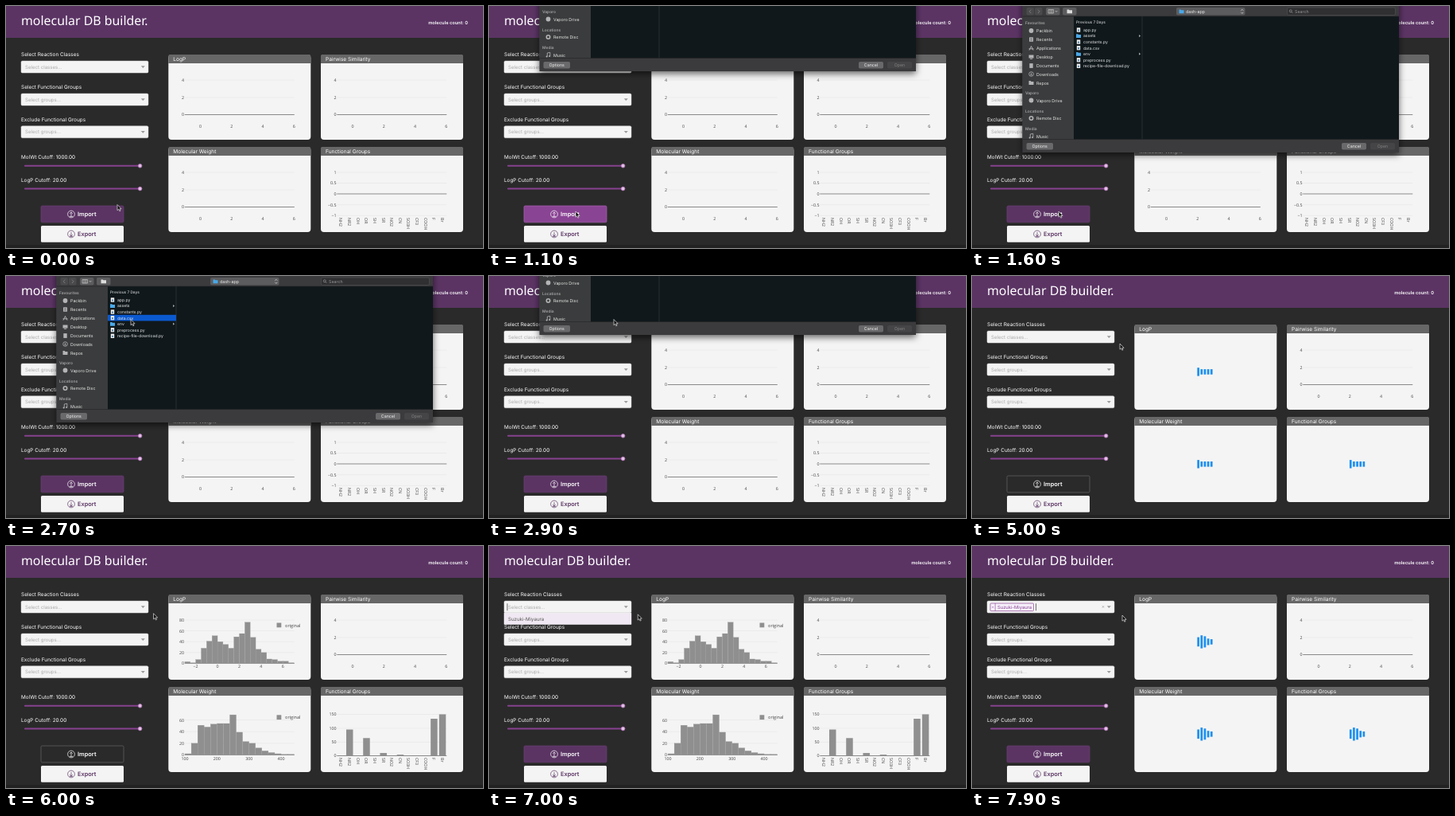
Write an HTML page that moves like this. It is 600 by 304 pixels and loops after 8 s.

```html
<!DOCTYPE html>
<html lang="en">
<head>
<meta charset="utf-8">
<title>molecular DB builder</title>
<style>
html, body { margin: 0; width: 100%; height: 100%; overflow: hidden; background: #2a2a2a; }
svg { display: block; width: 600px; height: 304px; }
text { font-family: Inter, "Open Sans", sans-serif; text-rendering: geometricPrecision; white-space: pre; }
.plot text { font-family: "Open Sans", sans-serif; }
</style>
</head>
<body>
<svg id="stage" viewBox="0 0 600 304"></svg>
<script>
const LOOP = 8000, STEP = 100;
const PURPLE = '#5b3464', PAPER = '#f4f4f4', INK = '#444';

// --- markup helpers ---
const rect = (x, y, w, h, fill, extra = '') =>
  `<rect x="${x}" y="${y}" width="${w}" height="${h}" fill="${fill}" ${extra}/>`;
const text = (x, y, size, fill, str, extra = '') =>
  `<text x="${x}" y="${y}" font-size="${size}" fill="${fill}" ${extra}>${str}</text>`;
const path = (d, stroke, width = 0.8, extra = '') =>
  `<path d="${d}" stroke="${stroke}" stroke-width="${width}" fill="none" ${extra}/>`;
const shape = (d, fill) => `<path d="${d}" fill="${fill}"/>`;
const group = (id, body, extra = '') => `<g id="${id}" ${extra}>${body}</g>`;
const END = 'text-anchor="end"', MID = 'text-anchor="middle"', BOLD = 'font-weight="600"';

// --- page ---
function select(y, label, hint, id) {
  return text(19, y - 5.6, 6.45, '#fff', label) +
    rect(19, y, 160, 15, PAPER, 'rx="1.6" stroke="#ccc" stroke-width=".5"') +
    group(id, text(24, y + 9.7, 6.1, '#aaa', hint)) +
    shape(`M169.8 ${y + 6.3}h5l-2.5 2.7z`, '#999');
}

function slider(y, label) {
  return text(19, y - 8.8, 6.4, '#fff', label) +
    rect(23, y - 1, 146, 2, '#87428f', 'rx="1"') +
    `<circle cx="168.6" cy="${y}" r="2.3" fill="#e3c3e6" stroke="#b678bd" stroke-width=".9"/>`;
}

function buttonFace(y, label, color, dir) {
  const cy = y + 10.5, tip = cy + 2.6 * dir;
  return `<circle cx="82" cy="${cy}" r="4.4" fill="none" stroke="${color}" stroke-width=".7"/>` +
    path(`M82 ${cy - 2.4}V${cy + 2.4}M80.3 ${tip - 1.8 * dir}L82 ${tip}L83.7 ${tip - 1.8 * dir}M80 ${cy + 2.9}h4`, color, 0.7) +
    text(90, y + 13.2, 7.4, color, label, BOLD);
}

function panel(x, y, title) {
  return rect(x, y, 179, 107, PAPER, 'rx="4"') +
    shape(`M${x} ${y + 11}v-9q0-2 2-2h175q2 0 2 2v9z`, '#676767') +
    text(x + 6, y + 8, 6.55, '#fff', title);
}

// --- plots ---
const tick = (x, y, label, extra) => text(x, y + 1.9, 5.3, INK, label, extra);

function yAxis(x, ticks, zero) {
  return ticks.map(([y, label]) =>
    path(`M${x} ${y}H${x + 138}`, label === zero ? INK : '#e4e4e4', 0.6) +
    tick(x - 0.8, y, label, END)).join('');
}

function emptyPlot(x, y) {
  return yAxis(x, [[y + 32, '4'], [y + 54, '2'], [y + 75.5, '0']], '0') +
    [0, 2, 4, 6].map(v => tick(x + 19.8 + v * 19.6, y + 90, v, MID)).join('');
}

function bars(x, base, pitch, scale, counts, fill = 1) {
  return counts.map((n, i) => n && rect(
    (x + pitch * (i + (1 - fill) / 2)).toFixed(2), (base - n * scale).toFixed(2),
    (pitch * fill).toFixed(2), (n * scale).toFixed(2), '#8f8f8f',
    fill === 1 ? 'stroke="#a0a0a0" stroke-width=".25"' : '')).filter(Boolean).join('');
}

const legend = y => rect(340.5, y - 3, 5.8, 5.8, '#8f8f8f') + text(351, y + 2, 5.6, INK, 'original');

const groupNames = ['NH2', 'NR2', 'OH', 'OR', 'SH', 'SR', 'NO2', 'CN', 'SO3H', 'CF3', 'COOH', 'F', 'Br'];
const groupLabels = groupNames.map((name, i) => {
  const x = (416 + 10.62 * (i + 0.5) - 1.9).toFixed(1);
  return `<text transform="translate(${x} 266) rotate(90)" font-size="5.3" fill="${INK}">${name}</text>`;
}).join('');

const emptyPlots = emptyPlot(224.8, 61) + emptyPlot(224.8, 177) +
  yAxis(416.3, [[209, '1'], [222.5, '0.5'], [236, '0'], [249.7, '−0.5'], [263.3, '−1']], '0') + groupLabels;

const logP = yAxis(224.8, [[93, '80'], [106.6, '60'], [120.2, '40'], [133.8, '20'], [147.4, '0']], '0') +
  bars(224.9, 147.4, 6.86, 0.68,
    [3, 1, 7, 28, 41, 51, 40, 35, 28, 49, 55, 76, 48, 26, 20, 8, 7, 4, 4, 1]) +
  [-2, 0, 2, 4, 6].map(v => tick(266 + v * 13.7, 151.5, String(v).replace('-', '−'), MID)).join('') +
  legend(99.5);

const weight = yAxis(224.8, [[218.6, '60'], [233.2, '40'], [247.8, '20'], [262.4, '0']], '0') +
  bars(225, 262.4, 8.07, 0.73, [2, 20, 51, 48, 53, 54, 54, 69, 39, 23, 20, 12, 7, 4, 2, 1, 1]) +
  [100, 200, 300, 400].map(v => tick(225 + (v - 100) * 0.4035, 267, v, MID)).join('') +
  legend(215.3);

const groupsPlot = yAxis(416.3, [[211.5, '150'], [229, '100'], [246.4, '50'], [263.5, '0']], '0') +
  bars(416.3, 263.5, 10.62, 0.347, [0, 95, 0, 64, 0, 10, 0, 4, 0, 0, 0, 134, 150], 0.8) + groupLabels;

// --- loader: five stretching bars ---
const loaderSpots = [[293, 120.4], [293, 236.3], [484.6, 236.3]];
const loaders = loaderSpots.map(([x]) =>
  [0, 1, 2, 3, 4].map(i => rect(x - 9.7 + i * 4.15, 0, 2.7, 0, '#1e90f0', 'class="bar"')).join('')).join('');

// --- file dialog ---
const folder = (x, y) => shape(`M${x} ${y - 2.3}h2.2l.8.8h3v4h-6z`, '#4aa8e8');
const page = (x, y) => rect(x + 0.8, y - 2.7, 4.4, 5.4, '#eee') + rect(x + 2, y - 0.6, 2, 2.2, '#5b87a8');
const pill = (x, y, w, h, fill) => rect(x, y, w, h, fill, 'rx="1.8"');

function sidebar() {
  const gray = '#b4b4b6';
  const heads = [['Favourites', 21.5], ['Vaporo', 109], ['Locations', 132], ['Media', 154]];
  const items = [['Packbin', 31], ['Recents', 42], ['Applications', 53], ['Desktop', 64], ['Documents', 75],
    ['Downloads', 85.5], ['Repos', 96.5], ['Vaporo Drive', 118.5], ['Remote Disc', 141], ['Music', 163.5]];
  const icons = [
    y => `<circle cx="74.5" cy="${y}" r="2.9" fill="${gray}"/>`,
    y => rect(72, y - 2.8, 5, 5.6, gray, 'rx=".6"') + path(`M73 ${y - 1}h3M73 ${y + 1}h3`, '#3b3c3d', 0.6),
    y => path(`M72 ${y + 2.6}L74.5 ${y - 2.6}L77 ${y + 2.6}M71.5 ${y + 0.8}h6`, gray, 0.9),
    y => rect(71.5, y - 2.5, 6, 4, gray) + rect(73, y + 2, 3, 0.8, gray),
    y => rect(72.3, y - 2.9, 4.4, 5.8, gray),
    y => `<circle cx="74.5" cy="${y}" r="2.8" fill="none" stroke="${gray}" stroke-width=".8"/>` +
      path(`M74.5 ${y - 1.6}v3M73.2 ${y + 0.3}l1.3 1.3l1.3-1.3`, gray, 0.7),
    y => shape(`M71.5 ${y - 2.4}h2.2l.8.8h3v4.2h-6z`, gray),
    y => `<circle cx="74.5" cy="${y}" r="2.9" fill="${gray}"/>`,
    y => `<circle cx="74.5" cy="${y}" r="2.2" fill="none" stroke="${gray}" stroke-width="1.6"/>`,
    y => path(`M73.3 ${y + 2}v-4.5l3.5-.7v4.5`, gray, 0.8) +
      `<circle cx="72.6" cy="${y + 2}" r="1" fill="${gray}"/><circle cx="76.1" cy="${y + 1.4}" r="1" fill="${gray}"/>`
  ];
  return heads.map(([s, y]) => text(67, y + 1.8, 4.9, '#a2a2a4', s, BOLD)).join('') +
    items.map(([s, y], i) => icons[i](y) + text(81, y + 2, 5.3, '#e6e6e6', s)).join('');
}

function files() {
  const names = ['app.py', 'assets', 'constants.py', 'data.csv', 'env', 'preprocess.py', 'recipe-file-download.py'];
  return text(131, 22.3, 4.8, '#b5b8ba', 'Previous 7 Days', BOLD) +
    group('picked', rect(128, 48.8, 86, 7.6, '#0b59cf')) +
    names.map((name, i) => {
      const y = 30 + i * 7.55, isFolder = !name.includes('.');
      return (isFolder ? folder(131, y) + shape(`M210 ${y - 1.6}l2.2 1.6l-2.2 1.6z`, '#a0a4a6') : page(131, y)) +
        text(140, y + 1.9, 5.1, '#e4e6e7', name);
    }).join('');
}

function toolbar() {
  return pill(68.5, 2, 9.5, 9.5, '#4a4a4c') + pill(79, 2, 9.5, 9.5, '#4a4a4c') +
    path('M74.2 4.6l-2 2.2l2 2.2M83 4.6l2 2.2l-2 2.2', '#858587', 0.8) +
    pill(93, 2, 17.5, 9.5, '#5c5c5e') +
    path('M96 4.6h6.6v4.4h-6.6zM98.2 4.6v4.4M100.4 4.6v4.4M104.8 6l1.3 1.4l1.3-1.4', '#ddd', 0.6) +
    pill(114, 2, 17.5, 9.5, '#5c5c5e') + shape('M119.5 4.4h2.3l.8.8h3.4v4h-6.5z', '#ddd') +
    pill(257, 2, 86.5, 9.5, '#5c5c5e') + folder(260.5, 6.8) + text(269, 8.8, 5.3, '#eee', 'dash-app') +
    path('M338.3 5.8l1.5-1.6l1.5 1.6M338.3 7.8l1.5 1.6l1.5-1.6', '#ddd', 0.7) +
    rect(396.5, 2, 136, 9.5, '#303032', 'rx="1.8" stroke="#59595b" stroke-width=".5"') +
    `<circle cx="400.8" cy="6.3" r="1.5" fill="none" stroke="#aaa" stroke-width=".6"/>` +
    path('M401.9 7.4l1.6 1.6', '#aaa', 0.6) + text(406, 8.8, 5.3, '#969698', 'Search');
}

const dialog = rect(63.5, -30, 473.5, 214, '#3b3b3d', 'filter="url(#shadow)"') +
  rect(63.5, 13, 64.5, 154.5, '#3b3c3d') + rect(128, 13, 409, 154.5, '#10181b') +
  path('M214 13V167.5', '#353c3f', 0.7) + path('M63.5 13H537M63.5 167.5H537', '#242426', 0.6) +
  toolbar() + sidebar() + files() +
  pill(68.5, 172, 33.5, 8.5, '#69696b') + text(85.2, 178.2, 5.3, '#f2f2f2', 'Options', MID) +
  pill(465, 172, 31, 8.5, '#69696b') + text(480.5, 178.2, 5.3, '#f2f2f2', 'Cancel', MID) +
  pill(501, 172, 31, 8.5, '#454547') + text(516.5, 178.2, 5.3, '#808082', 'Open', MID);

// --- chosen reaction class ---
const TAG = '#8a4694';
const chosen = rect(23, 72, 54.5, 9.6, '#f6effa', `rx="1" stroke="${TAG}" stroke-width=".7"`) +
  path('M29.2 72v9.6', TAG, 0.6) + path('M25.3 75.9l1.7 1.7m0-1.7l-1.7 1.7', TAG, 0.5) +
  text(32, 78.9, 5.8, TAG, 'Suzuki-Miyaura') +
  path('M163.8 75.3l2.2 2.2m0-2.2l-2.2 2.2', '#888', 0.6);

const menu = rect(19, 84, 160, 14.5, '#fff', 'stroke="#ccc" stroke-width=".5"') +
  rect(19.3, 84.3, 159.4, 14, '#f0e8f2') + text(24, 93.5, 6.1, '#555', 'Suzuki-Miyaura');

const stage = document.getElementById('stage');
stage.innerHTML =
  `<defs><filter id="shadow" x="-10%" y="-10%" width="120%" height="125%">
    <feDropShadow dx="0" dy="3" stdDeviation="4" flood-color="#000" flood-opacity=".6"/></filter></defs>` +
  rect(0, 0, 600, 304, '#2a2a2a') + rect(0, 300, 600, 4, '#222') + rect(0, 0, 600, 40, PURPLE) +
  text(19, 24, 15.9, '#fff', 'molecular DB builder.', 'style="font-family:\'Noto Sans\',sans-serif"') +
  text(581, 22.8, 5.75, '#fff', 'molecule count: 0', `${END} ${BOLD}`) +
  select(69, 'Select Reaction Classes', 'Select classes...', 'hint') +
  select(110, 'Select Functional Groups', 'Select groups...', 'hint2') +
  select(150.7, 'Exclude Functional Groups', 'Select groups...', 'hint3') +
  slider(200.8, 'MolWt Cutoff: 1000.00') + slider(229.5, 'LogP Cutoff: 20.00') +
  rect(44, 251, 104, 20.8, PURPLE, 'id="import" rx="1.5" stroke-width=".7"') +
  buttonFace(251, 'Import', '#fff', -1) +
  rect(44, 276, 104, 20.8, PAPER, 'rx="1.5"') + buttonFace(276, 'Export', PURPLE, 1) +
  panel(204.3, 61, 'LogP') + panel(396, 61, 'Pairwise Similarity') +
  panel(204.3, 177, 'Molecular Weight') + panel(396, 177, 'Functional Groups') +
  group('pairwise', emptyPlot(416.3, 61), 'class="plot"') +
  group('empty', emptyPlots, 'class="plot"') +
  group('full', logP + weight + groupsPlot, 'class="plot"') +
  group('loading', loaders) + group('menu', menu) + group('chosen', chosen) +
  group('caret', path('M0 72.2v9', '#333', 0.7)) +
  group('dialog', dialog) +
  group('cursor', '<path d="M0 0V7.2L1.7 5.7L2.8 8.2L4 7.7L2.9 5.3H5.1Z" fill="#111" stroke="#fff" stroke-width=".6"/>');

// --- motion ---
const $ = id => document.getElementById(id);
const barNodes = [...document.querySelectorAll('.bar')];
const smooth = p => p * p * (3 - 2 * p);
const linear = p => p;

const cursorKeys = [[0, 140, 249.5], [100, 140, 249.5], [700, 109, 258], [1850, 109, 258], [2600, 157, 54.5],
  [2900, 157, 54.5], [3100, 162, 57], [3600, 183, 82], [3900, 183, 82], [4100, 186, 85],
  [5950, 186, 85], [6400, 172, 76], [6600, 172, 76], [7100, 189, 87], [LOOP, 189, 87]];
const dialogKeys = [[0, -200], [900, -200], [1000, -160], [1100, -102], [1200, -40], [1300, -8], [1400, 0],
  [2700, 0], [2800, -35], [2900, -110], [3000, -170], [3100, -200], [LOOP, -200]];

function track(keys, t, ease) {
  const i = Math.max(1, keys.findIndex(k => k[0] >= t));
  const a = keys[i - 1], b = keys[i], p = ease((t - a[0]) / (b[0] - a[0]));
  return a.slice(1).map((v, n) => v + (b[n + 1] - v) * p);
}

function stretch(ms) {
  const phase = ((ms % 1200) + 1200) % 1200;
  return phase > 480 ? 0.4 : 0.4 + 0.6 * smooth(1 - Math.abs(phase - 240) / 240);
}

const show = (id, on) => $(id).setAttribute('visibility', on ? 'visible' : 'hidden');
const within = (t, a, b) => t >= a && t < b;

function render(t) {
  const loading = within(t, 5000, 5700) || t >= 7600;
  show('empty', t < 5000);
  show('full', within(t, 5700, 7600));
  show('loading', loading);
  show('menu', within(t, 6700, 7600));
  show('hint', t < 7600);
  show('chosen', t >= 7600);
  show('caret', t >= 6600);
  $('caret').setAttribute('transform', `translate(${t < 7600 ? 23 : 80.5} 0)`);

  const start = t < 7000 ? 4900 : 7540;
  barNodes.forEach((bar, n) => {
    const h = 16.6 * stretch(Math.max(0, t - start - (n % 5) * 100));
    bar.setAttribute('height', h);
    bar.setAttribute('y', loaderSpots[Math.floor(n / 5)][1] - h / 2);
  });

  const [fill, edge] = within(t, 200, 1500) ? ['#8a4494', '#a763b0']
    : within(t, 3200, 6600) ? ['#2a2a2a', '#666'] : [PURPLE, '#6b4174'];
  $('import').setAttribute('fill', fill);
  $('import').setAttribute('stroke', edge);

  show('dialog', within(t, 1000, 3100));
  show('picked', t >= 2700);
  $('dialog').setAttribute('transform', `translate(0 ${track(dialogKeys, t, linear)[0]})`);
  $('cursor').setAttribute('transform', `translate(${track(cursorKeys, t, smooth).join(' ')})`);
}

const origin = performance.now();
function tickFrame() {
  const t = (performance.now() - origin) % LOOP;
  render(Math.floor(t / STEP) * STEP);
  requestAnimationFrame(tickFrame);
}
tickFrame();
</script>
</body>
</html>
```
